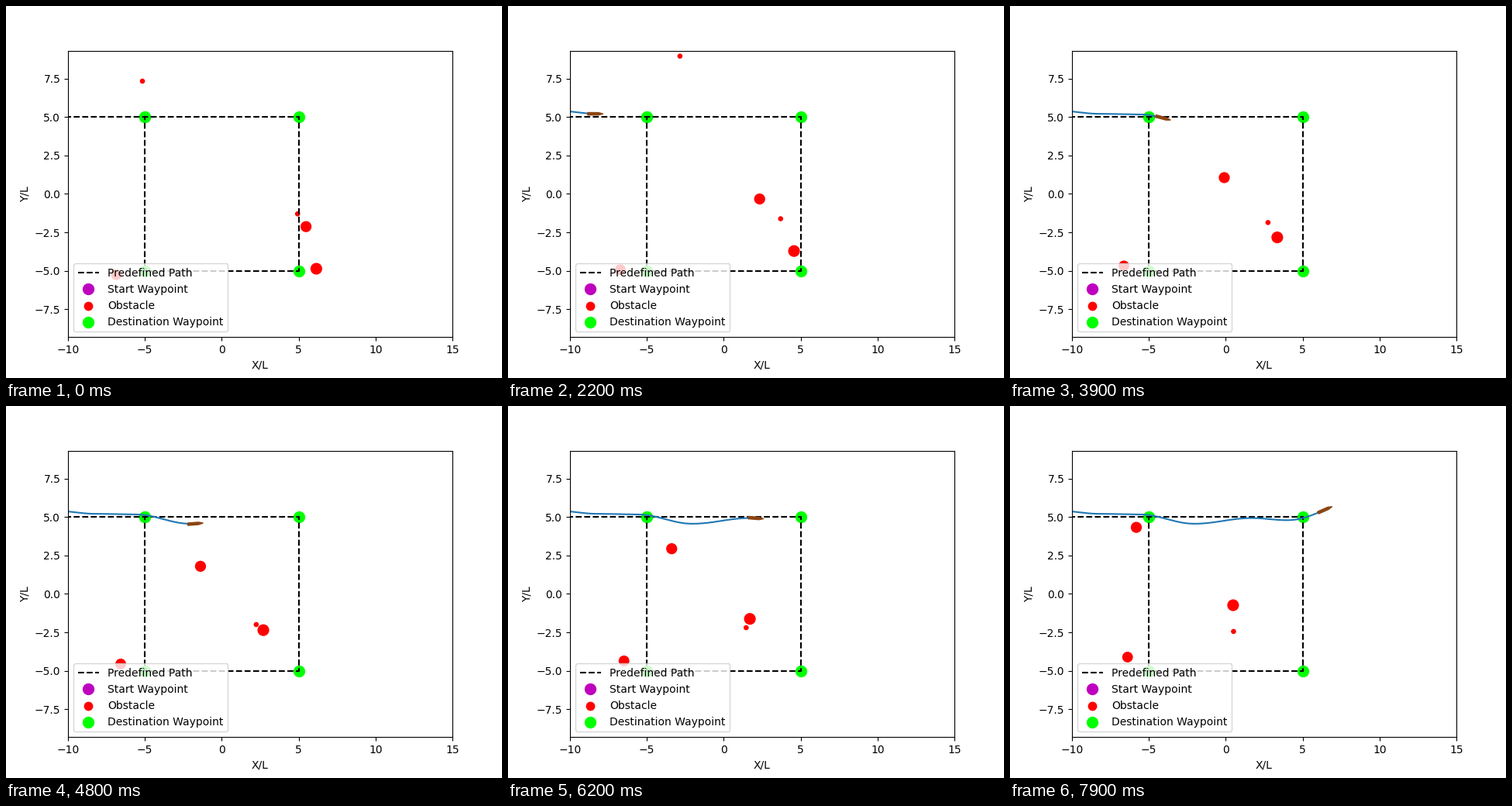
Animation, 640 px wide and 480 px high, one loop 8000 ms. Source, as a matplotlib script:

```python
import numpy as np
import matplotlib.pyplot as plt
from matplotlib.animation import FuncAnimation

FRAMES, STEP = 80, 100  # step in ms
HALF = 5                # half side of the square path

# Each obstacle drifts in a straight line: start, velocity per second, size
START = np.array([(-5.16, 7.33), (4.93, -1.30), (5.48, -2.13),
                  (6.15, -4.87), (-6.86, -5.25)])
DRIFT = np.array([(1.05, 0.74), (-0.56, -0.145), (-1.43, 0.817),
                  (-0.718, 0.523), (0.06, 0.144)])
SIZES = [14, 14, 86, 98, 80]

# Turning points of the ship's weaving course
TURNS = [(-11, 5.42), (-8.2, 5.205), (-5.6, 5.165), (-2.04, 4.56),
         (1.69, 4.93), (4, 4.79), (9, 6.2)]

HULL = np.array([(-0.5, -0.08), (0.2, -0.08), (0.5, 0),
                 (0.2, 0.08), (-0.5, 0.08)])


def course(x):
    """Sum of cosine eases from one turning point to the next."""
    y = TURNS[0][1]
    for (x0, y0), (x1, y1) in zip(TURNS, TURNS[1:]):
        u = np.clip((x - x0) / (x1 - x0), 0, 1)
        y = y + (y1 - y0) * (1 - np.cos(np.pi * u)) / 2
    return y


def ship_x(t):
    """Steady speed with a slight surge."""
    s = t - 3.1
    return -6.08 + 2.6125 * s - 0.09 * np.sin(2 * np.pi * s / 4.8)


def hull_at(x):
    # The bow turns a little ahead of the track
    ahead, d = x + 0.3, 0.15
    angle = np.arctan2(course(ahead + d) - course(ahead - d), 2 * d)
    c, s = np.cos(angle), np.sin(angle)
    return HULL @ np.array([(c, s), (-s, c)]) + (x, course(x))


fig, ax = plt.subplots(figsize=(6.4, 4.8), dpi=100)
ax.set(xlim=(-10, 15), ylim=(-9.314, 9.314), xlabel="X/L", ylabel="Y/L")

corners = HALF * np.array([(-1, 1), (1, 1), (1, -1), (-1, -1), (-1, 1)])
route = np.vstack([(-15, HALF), corners])
ax.plot(*route.T, "k--", label="Predefined Path")
ax.plot(*route[0], "mo", markersize=10, label="Start Waypoint")
obstacles = ax.scatter(*START.T, s=SIZES, color="red", label="Obstacle")
ax.scatter(*corners.T, s=100, color="lime", label="Destination Waypoint")
wake, = ax.plot([], [], color="tab:blue")
ship, = ax.fill(*HULL.T, facecolor="saddlebrown", edgecolor="saddlebrown",
                linewidth=1, zorder=3)
ax.legend(loc="lower left")


def update(frame):
    t = frame * STEP / 1000
    obstacles.set_offsets(START + t * DRIFT)
    x = ship_x(t)
    xs = np.linspace(-15, x, 400)
    wake.set_data(xs, course(xs))
    ship.set_xy(hull_at(x))
    return obstacles, wake, ship


anim = FuncAnimation(fig, update, frames=FRAMES, interval=STEP,
                     repeat=True, repeat_delay=0)
plt.show()
```
